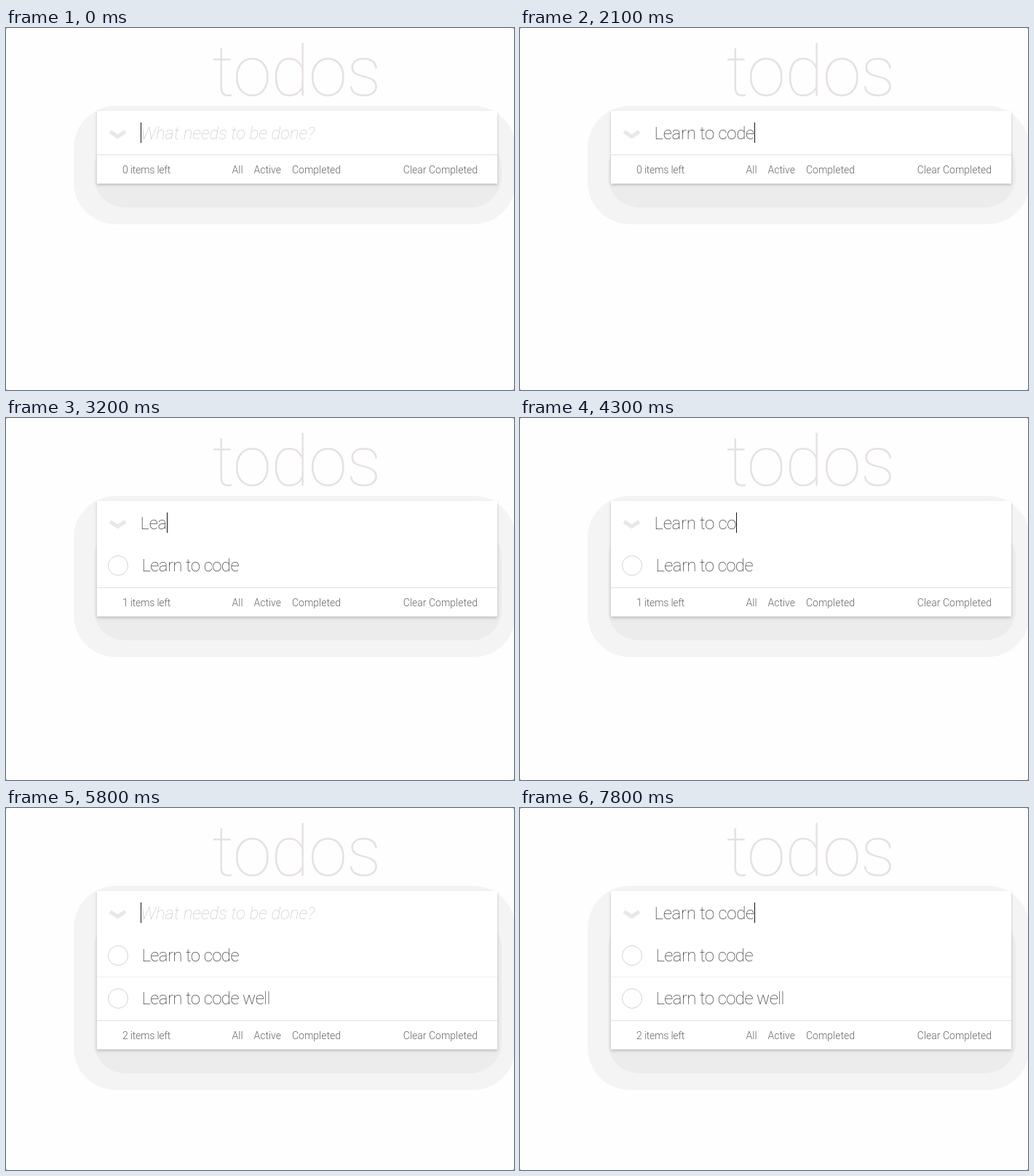
Animation, 698 px wide and 498 px high, one loop 8000 ms. Source, as an HTML page with a canvas:

```html
<!DOCTYPE html>
<html lang="en">
<head>
<meta charset="utf-8">
<title>Todo list</title>
<style>
  html, body { margin: 0; width: 100%; height: 100%; overflow: hidden; background: #fefefe; }
  canvas { display: block; }
</style>
</head>
<body>
<canvas id="stage" width="698" height="498"></canvas>
<script>
const ctx = document.getElementById('stage').getContext('2d');
const LOOP = 8000, W = 698, H = 498;
const CARD = { x: 125, y: 114, w: 550, input: 60, row: 59, footer: 40 };
const FACE = 'Roboto, "Liberation Sans", Arial, sans-serif';
const PHRASE = 'Learn to code well';

// Each burst types at a steady pace until `length` characters stand in the input.
const burst = (from, to, length) => ({ from, to, length });
const ENTRIES = [
  { end: 2200, bursts: [burst(100, 200, 2), burst(600, 1600, 10), burst(1800, 2000, 13)] },
  { end: 5800, bursts: [burst(2900, 3200, 3), burst(3400, 4100, 10), burst(4300, 4700, 14), burst(4900, 5500, 18)] },
  { end: LOOP, bursts: [burst(6300, 6700, 3), burst(6900, 7800, 13)] }
];

function typedAt(t) {
  let count = 0;
  for (const { from, to, length } of ENTRIES.find(e => t < e.end).bursts) {
    if (t < from) break;
    const pace = Math.min(1, (t - from) / (to - from));
    const first = count + 1;
    count = Math.floor(first + (length - first) * pace + 1e-6);
  }
  return PHRASE.slice(0, count);
}

function text(str, x, y, { size = 24, weight = 200, style = 'normal', color = '#2a2a2a', track = 0, align = 'left' } = {}) {
  ctx.font = `${style} ${weight} ${size}px ${FACE}`;
  ctx.letterSpacing = track + 'px';
  ctx.textAlign = align;
  ctx.fillStyle = color;
  ctx.fillText(str, x, y);
  return ctx.measureText(str).width;
}

function rect(x, y, w, h, color) {
  ctx.fillStyle = color;
  ctx.fillRect(x, y, w, h);
}

function roundRect(x, y, right, bottom, r, color) {
  ctx.fillStyle = color;
  ctx.beginPath();
  ctx.roundRect(x, y, right - x, bottom - y, r);
  ctx.fill();
}

function background() {
  rect(0, 0, W, H, '#fefefe');
  for (const x of [0, W - 1]) {
    for (const y of [0, H - 1]) rect(x, y, 1, 1, '#888');
  }
  text('todos', 399, 92.5, { size: 96.5, weight: 100, color: '#e7e1e1', track: -1, align: 'center' });
}

function card(count) {
  const { x, y, w } = CARD;
  const bottom = y + CARD.input + CARD.row * count + CARD.footer;
  roundRect(93, 107, 700, bottom + 56, 58, '#f4f4f4');
  roundRect(121, 150, 681, bottom + 33, 42, '#ececec');

  ctx.save();
  ctx.shadowColor = 'rgba(0,0,0,.2)';
  ctx.shadowBlur = 4;
  ctx.shadowOffsetY = 2;
  rect(x, y, w, bottom - y, '#fff');
  ctx.restore();
}

function chevron(x, y) {
  ctx.strokeStyle = '#e8e8e8';
  ctx.lineWidth = 5.2;
  ctx.beginPath();
  ctx.moveTo(x - 10.5, y - 4);
  ctx.lineTo(x, y + 3);
  ctx.lineTo(x + 10.5, y - 4);
  ctx.stroke();
}

function input(t) {
  const typed = typedAt(t);
  let caret = 185;
  if (typed) {
    caret = Math.round(184.6 + text(typed, 184.6, 153, { track: -0.28 }));
  } else {
    text('What needs to be done?', 185, 153, { style: 'italic', color: '#c6c6c6', track: -0.1 });
  }
  const blink = t >= 2700 && t < 2900;
  if (!blink) rect(caret, 130, 1, 28, '#111');
}

function item(label, i) {
  const dy = CARD.row * i;
  if (i) rect(CARD.x, 173 + dy, CARD.w, 1, '#eee');
  ctx.strokeStyle = '#d3d3d3';
  ctx.lineWidth = 1;
  ctx.beginPath();
  ctx.arc(154, 203 + dy, 13.5, 0, Math.PI * 2);
  ctx.stroke();
  text(label, 186.5, 211 + dy, { track: -0.58 });
}

function footer(count) {
  const y = CARD.y + CARD.input + CARD.row * count;
  const label = (str, x, more) =>
    text(str, x, y + 26, { size: 14, weight: 300, color: '#666', ...more });
  rect(CARD.x, y, CARD.w, 1, '#e0e0e0');
  label(`${count} items left`, 160, { track: -0.2 });
  label('All', 310.5);
  label('Active', 340.5);
  label('Completed', 393);
  label('Clear Completed', 648, { align: 'right' });
}

function draw(t) {
  const items = ENTRIES.filter(e => e.end <= t).map(e => typedAt(e.end - 1));
  background();
  card(items.length);
  chevron(153.5, 146.5);
  input(t);
  items.forEach(item);
  footer(items.length);
}

const start = performance.now();
function tick() {
  draw((performance.now() - start) % LOOP);
  requestAnimationFrame(tick);
}
tick();
</script>
</body>
</html>
```
